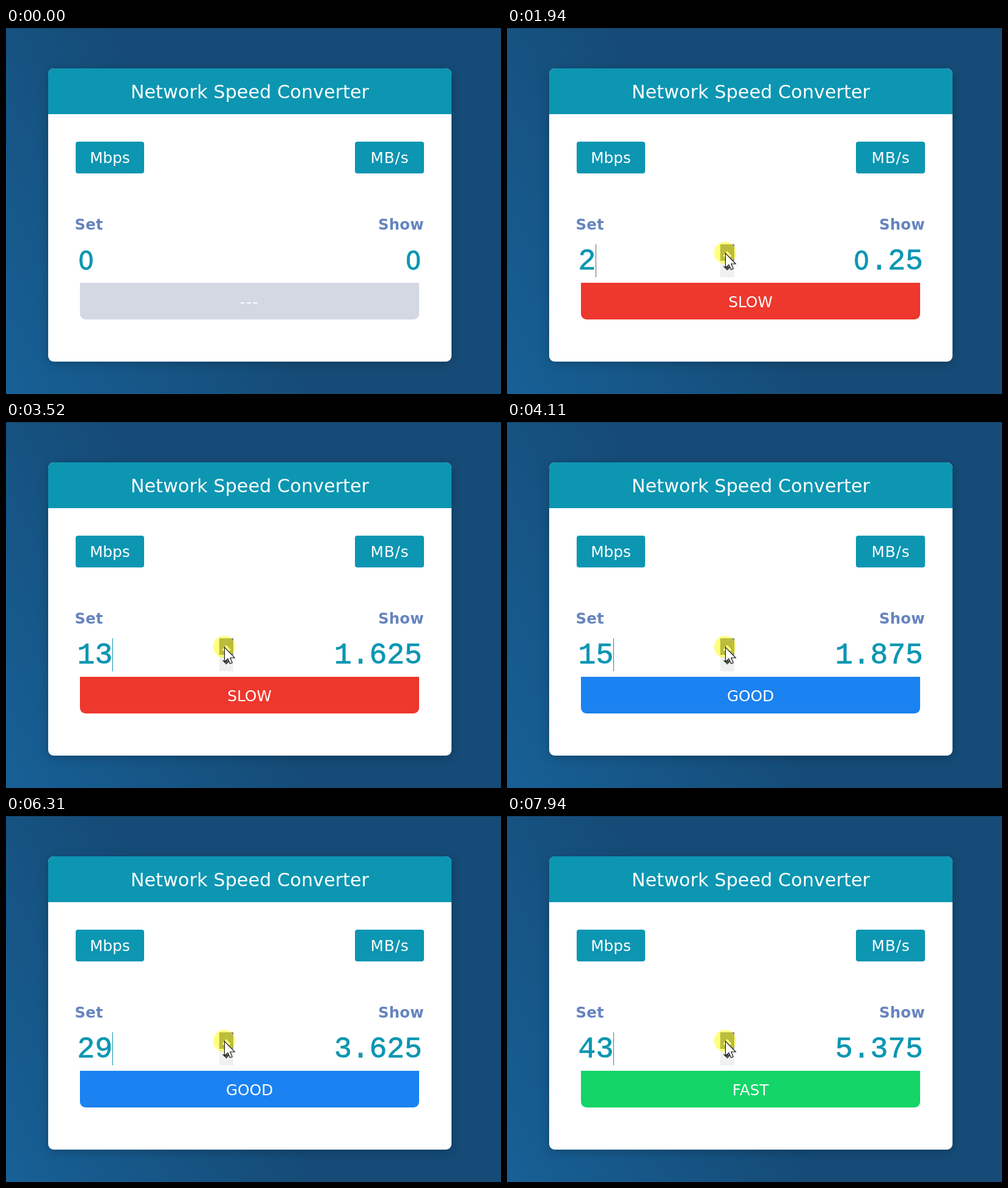
These frames come from a looping animation (810x599 px, 8000 ms). An HTML page:

```html
<!DOCTYPE html>
<html lang="en">
<head>
<meta charset="utf-8">
<title>Network Speed Converter</title>
<style>
html, body { margin: 0; width: 100%; height: 100%; overflow: hidden; background: #154b76; }
svg { display: block; font: 24.7px "DejaVu Sans", Verdana, sans-serif; }
.white { fill: #fff; }
.mid { text-anchor: middle; }
.teal { fill: #0c96b2; }
.title { font-size: 30px; letter-spacing: .1px; }
.head { font-weight: bold; font-size: 24.3px; letter-spacing: .25px; fill: #6584bf; }
.digit { font: 48px "Liberation Mono", monospace; fill: #0c96b2; stroke: #0c96b2; stroke-width: .8px; text-anchor: middle; }
.zero { font: 41px "DejaVu Sans", sans-serif; }
.card { filter: drop-shadow(0 3px 8px #0003); }
</style>
</head>
<body>
<svg width="810" height="599" viewBox="0 0 810 599">
  <defs>
    <linearGradient id="sky" gradientUnits="userSpaceOnUse" x1="0" y1="599" x2="390" y2="384">
      <stop stop-color="#176096"/><stop offset="1" stop-color="#154b76"/>
    </linearGradient>
  </defs>
  <rect width="810" height="599" fill="url(#sky)"/>
  <rect width="810" height="1" fill="#123c5d"/>
  <rect class="card white" x="69" y="66" width="660" height="480" rx="9"/>
  <path class="teal" d="M69 141V75a9 9 0 0 1 9-9H720a9 9 0 0 1 9 9V141Z"/>
  <text class="white mid title" x="399" y="115">Network Speed Converter</text>
  <rect class="teal" x="114" y="186" width="112" height="52" rx="4"/>
  <rect class="teal" x="571" y="186" width="113" height="52" rx="4"/>
  <text class="white mid" x="170" y="221">Mbps</text>
  <text class="white mid" x="628" y="221" letter-spacing=".9">MB/s</text>
  <text class="head" x="112.5" y="330">Set</text>
  <text class="head" x="684" y="330" text-anchor="end">Show</text>
  <path id="bar" d="M121 417H676V468a9 9 0 0 1-9 9H130a9 9 0 0 1-9-9Z"/>
  <text id="label" class="white mid" x="398.5" y="457"></text>
  <g id="digits"></g>
  <rect id="caret" y="354" width="1" height="54"/>
  <g id="spinner">
    <rect x="349" y="354" width="23" height="54" fill="#f0f0f0"/>
    <rect id="upper" x="349" y="354" width="23" height="27"/>
    <path id="up" d="M353.5 373L360.5 365L367.5 373L364.5 375L360.5 371L356.5 375Z"/>
    <path d="M353.5 390H367.5L360.5 397Z" fill="#505050"/>
  </g>
  <circle id="press" cx="357" cy="368" r="18" fill="#ff0" fill-opacity=".5"/>
  <g id="pointer">
    <path id="arrow" d="M.5 .5V24.5L6 19.5L9.7 27.5L13.2 26L9.8 18H17.3Z" fill="#fff" stroke="#111" stroke-width="1.1"/>
    <path id="beam" d="M-4-12H4M0-12V12M-4 12H4" fill="none" stroke="#111" stroke-width="1.5"/>
  </g>
</svg>
<script>
const $ = id => document.getElementById(id);
const LOOP = 8000, PITCH = 28.8, DELAY = 260, STEP = 70;

// time down, time up, repeats while held
const clicks = [
  [1470, 1540], [1940, 2070], [2140, 2210], [2285, 2355], [2425, 2500], [2570, 3120, 5],
  [3320, 3450], [3520, 3650], [3720, 3850], [4110, 4240],
  [4590, 4660], [4730, 4800], [4870, 4940], [4940, 5010], [5080, 5150], [5220, 5290],
  [5360, 5560], [5630, 5700], [5770, 5840], [5910, 6240, 3],
  [6310, 6440], [6510, 6580], [6645, 6780], [6780, 7270, 6], [7530, LOOP, 4]
];
// time, x, y of the pointer tip
const path = [[260, 627, 575], [410, 470, 490], [560, 270, 405], [680, 170, 380], [850, 280, 362], [1010, 357, 368]];

const rating = v =>
  v >= 40 ? ['FAST', '#14d568'] : v >= 15 ? ['GOOD', '#1b82f1'] : v ? ['SLOW', '#ee372d'] : ['---', '#d4d8e3'];

const show = (id, on) => $(id).style.display = on ? '' : 'none';

// A held button repeats every 50 ms, seen at the screen's slower steps.
function repeats(held) {
  if (held < DELAY) return 0;
  const seen = DELAY + Math.floor((held - DELAY) / STEP) * STEP;
  return 1 + Math.floor((seen - 230) / 50 + .1);
}

function valueAt(t) {
  let value = 0;
  for (const [down, up, extra = 0] of clicks) {
    if (t >= down) value += 1 + (t >= up ? extra : Math.min(extra, repeats(t - down)));
  }
  return value;
}

function cells(text, first) {
  return [...text].map((c, i) =>
    `<text class="digit${c === '0' ? ' zero' : ''}" x="${first + i * PITCH}" y="394.5">${c}</text>`).join('');
}

function pointerAt(t) {
  const i = path.findIndex(p => p[0] > t);
  if (i < 0) return path.at(-1).slice(1);
  const [t0, x0, y0] = path[i - 1], [t1, x1, y1] = path[i];
  const k = (t - t0) / (t1 - t0);
  return [x0 + (x1 - x0) * k, y0 + (y1 - y0) * k];
}

function movePointer(t) {
  const visible = t >= 260;
  show('pointer', visible);
  const step = 260 + Math.floor((t - 260) / 75) * 75;
  const [x, y] = visible ? pointerAt(step) : [0, 0];
  const inside = visible && x > 114 && x < 372 && y > 354 && y < 408;
  const hover = inside && x >= 349;
  show('spinner', inside);
  show('beam', inside && !hover);
  show('arrow', !inside || hover);
  $('upper').setAttribute('fill', hover ? '#7b7b7b' : '#f0f0f0');
  $('up').setAttribute('fill', hover ? '#fff' : '#505050');
  $('pointer').setAttribute('transform', `translate(${x} ${y})`);
}

let shown = -1;
function setValue(v) {
  if (v === shown) return;
  shown = v;
  const set = String(v), out = String(v / 8), [word, color] = rating(v);
  $('digits').innerHTML = cells(set, 131) + cells(out, 666.5 - (out.length - 1) * PITCH);
  $('label').textContent = word;
  $('label').setAttribute('letter-spacing', v ? 0 : 1.8);
  $('bar').setAttribute('fill', color);
  $('caret').setAttribute('x', set.length > 1 ? 174 : 145);
  $('caret').setAttribute('fill', set.length > 1 ? '#0c96b2' : '#666');
  show('caret', v > 0);
}

function draw(t) {
  setValue(valueAt(t));
  show('press', clicks.some(([down, up]) => t >= down && t < up));
  movePointer(t);
}

const start = performance.now();
function tick() {
  draw(Math.max(0, performance.now() - start) % LOOP);
  requestAnimationFrame(tick);
}
tick();
</script>
</body>
</html>
```
